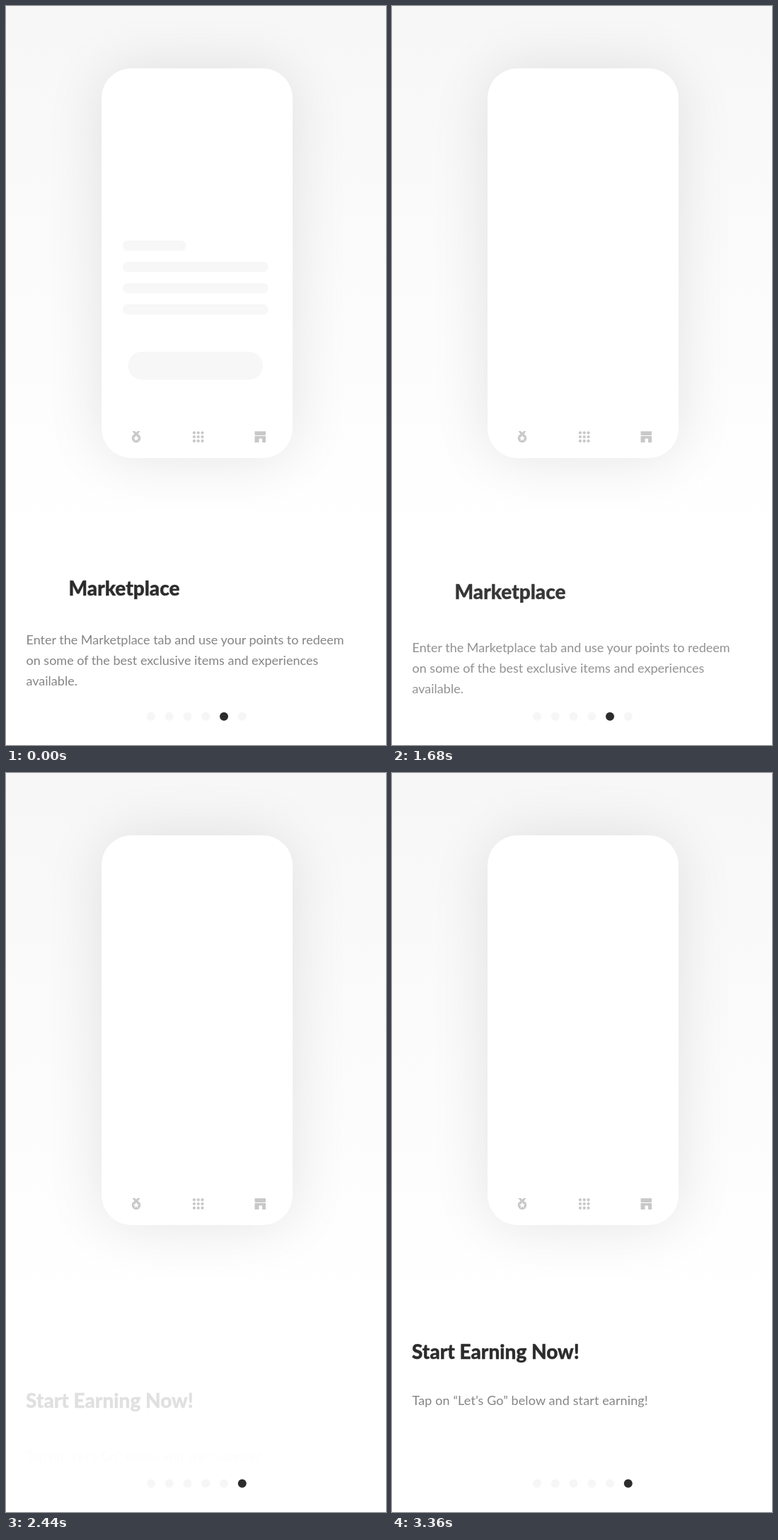
An HTML page that plays this animation: 537x1043 px, repeating every 3400 ms.

```html
<!DOCTYPE html>
<html lang="en">
<head>
<meta charset="utf-8">
<title>Onboarding</title>
<style>
html, body { margin: 0; width: 100%; height: 100%; overflow: hidden; background: #fff; }
svg { display: block; width: 537px; height: 1043px; }
text { font-family: Lato, "Open Sans", sans-serif; }
.title { font-size: 28px; font-weight: 800; fill: #2c2c2c; stroke: #2c2c2c; stroke-width: .4px; }
.copy { font-size: 18px; fill: #858585; }
.note { letter-spacing: .12px; }
</style>
</head>
<body>
<svg viewBox="0 0 537 1043">
  <defs>
    <linearGradient id="sky" x2="0" y2="1">
      <stop stop-color="#f7f7f7"/><stop offset="1" stop-color="#fff"/>
    </linearGradient>
  </defs>
  <rect width="537" height="747" fill="url(#sky)"/>
  <rect x="135" y="88" width="270" height="550" rx="42" opacity=".1" style="filter:blur(42px)"/>
  <rect x="135" y="88" width="270" height="550" rx="42" fill="#fff"/>

  <g id="bars" fill="#f7f7f7">
    <rect x="165" y="331" width="89.500" height="14.500" rx="7"/>
    <rect x="165" y="361" width="205.500" height="14.500" rx="7"/>
    <rect x="165" y="391" width="205.500" height="14.500" rx="7"/>
    <rect x="165" y="421" width="205.500" height="14.500" rx="7"/>
    <rect x="172.500" y="488" width="190.500" height="39.500" rx="19.700"/>
  </g>

  <g fill="#c8c8c8">
    <path d="M178.500 600h3.700l1.800 2.200 1.800-2.200h3.700l-3.300 4.600h-4.400z"/>
    <circle cx="184" cy="610" r="6.200"/>
    <path fill="#fff" d="M184 605.600l1.200 2.900 3.100.2-2.400 2 .8 3-2.700-1.700-2.700 1.700.8-3-2.400-2 3.100-.2z"/>
    <g id="grid"></g>
    <path d="M351.500 600.200h15.500v4.500l-1 1.300h-13.500l-1-1.300z"/>
    <path d="M351.500 607h15.500v9h-5v-5.500h-4.500v5.500h-6z"/>
  </g>

  <g id="dots"></g>

  <text class="title" x="88.500" y="832.300">Marketplace</text>
  <text class="copy" y="901.300">
    <tspan x="28.500">Enter the Marketplace tab and use your points to redeem</tspan>
    <tspan x="28.500" dy="28.800">on some of the best exclusive items and experiences</tspan>
    <tspan x="28.500" dy="28.800">available.</tspan>
  </text>
  <text class="title" x="28" y="827.300">Start Earning Now!</text>
  <text class="copy note" x="28.500" y="892.300">Tap on “Let’s Go” below and start earning!</text>
</svg>
<script>
const LOOP = 3400, STEP = 40, LEAVE = 1360, SWITCH = 1800;
const $ = id => document.getElementById(id);
const [oldTitle, oldCopy, newTitle, newCopy] = document.querySelectorAll('text');
const clamp = x => Math.min(1, Math.max(0, x));

function addCircle(parent, cx, cy, r) {
  const c = document.createElementNS('http://www.w3.org/2000/svg', 'circle');
  for (const [k, v] of Object.entries({ cx, cy, r })) c.setAttribute(k, v);
  parent.append(c);
  return c;
}
for (let i = 0; i < 9; i++) addCircle($('grid'), 265.9 + i % 3 * 5.8, 602.3 + Math.floor(i / 3) * 5.8, 2.1);
const dots = Array.from({ length: 6 }, (_, i) => addCircle($('dots'), 205 + i * 25.75, 1002.8, 6));

// Cubic Bezier (.4, 0, .2, 1), solved for x by bisection
function settle(x) {
  let lo = 0, hi = 1;
  for (let i = 0; i < 24; i++) {
    const s = (lo + hi) / 2, u = 1 - s;
    if (1.2 * u * u * s + 0.6 * u * s * s + s ** 3 < x) lo = s; else hi = s;
  }
  return lo * lo * (3 - 2 * lo);
}

function place(el, dy, opacity) {
  el.setAttribute('transform', `translate(0 ${dy})`);
  el.setAttribute('opacity', opacity);
}
function leave(el, t, start) {
  const p = clamp((t - start) / 760) ** 3;
  place(el, 100 * p, 1 - p);
}
function enter(el, t, start) {
  const p = settle(clamp((t - start) / 1000));
  place(el, 80 * (1 - p), p);
}

function draw(now) {
  const t = Math.floor(now % LOOP / STEP) * STEP;
  $('bars').setAttribute('visibility', t < LEAVE ? 'visible' : 'hidden');
  const active = t < SWITCH ? 4 : 5;
  dots.forEach((d, i) => d.setAttribute('fill', i === active ? '#2c2c2c' : '#f6f6f6'));
  leave(oldTitle, t, 1400);
  leave(oldCopy, t, 1320);
  enter(newTitle, t, 2235);
  enter(newCopy, t, 2350);
}

const begin = performance.now();
function tick() {
  draw(performance.now() - begin);
  requestAnimationFrame(tick);
}
tick();
</script>
</body>
</html>
```
